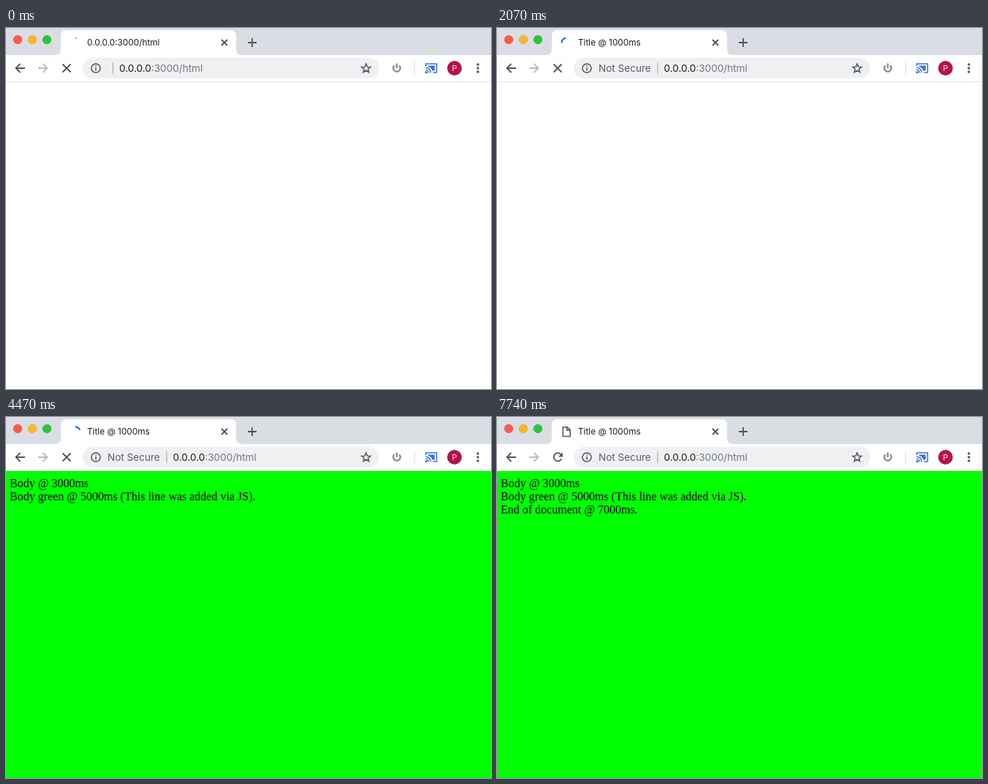
These frames come from a looping animation (664x494 px, 7.83 s). An HTML page:

```html
<!DOCTYPE html>
<html lang="en">
<head>
<meta charset="utf-8">
<title>Progressive page load</title>
<style>
html, body { margin: 0; width: 100%; height: 100%; overflow: hidden; background: #fff; }
svg { display: block; }
.line { fill: none; stroke: #505459; stroke-width: 1.8; }
.thin { stroke-width: 1.5; }
.ui { font-family: Inter, Roboto, sans-serif; font-size: 13.55px; fill: #18191b; }
.page { font: 16px "Liberation Serif", "Times New Roman", serif; fill: #000; }
.soft { fill: #74787d; }
</style>
</head>
<body>
<svg width="664" height="494" viewBox="0 0 664 494">
  <rect width="664" height="494" fill="#fff"/>
  <rect width="664" height="37" fill="#dadde3"/>
  <g stroke-width=".6">
    <circle cx="16" cy="16" r="5.8" fill="#ff5a4a" stroke="#e2493f"/>
    <circle cx="36" cy="16" r="5.8" fill="#fdb62a" stroke="#e0a02a"/>
    <circle cx="56" cy="16" r="5.8" fill="#28c63c" stroke="#1cad2c"/>
  </g>
  <path d="M67 37q8 0 8-8V11q0-8 8-8H307q8 0 8 8V29q0 8 8 8z" fill="#fff"/>
  <path class="line" d="M295 16l8 8m0-8l-8 8M331 20h12m-6-6v12"/>
  <text id="title" class="ui" x="111" y="24" style="font-size:11.8px"></text>
  <circle id="spinner" r="6.4" fill="none" stroke-width="2" pathLength="360"/>
  <path id="doc" class="line thin" d="M90.2 13.7h5.8l4.2 4.2v8.6h-10zM95.7 13.9v4.3h4.3"/>

  <path class="line" d="M26 55H13.5m6-6l-6 6 6 6"/>
  <path class="line" style="stroke:#b9bbbe" d="M44 55h12.5m-6-6l6 6-6 6"/>
  <path id="stop" class="line" d="M77.5 49.5l11 11m0-11l-11 11"/>
  <g id="reload">
    <path class="line" d="M87.6 51.2A5.6 5.6 0 1 0 88.4 57"/>
    <path d="M89.8 48.5v6h-6z" fill="#505459"/>
  </g>
  <rect x="105" y="41" width="406" height="28" rx="14" fill="#eef0f2"/>
  <circle class="line thin" cx="123" cy="55" r="6.1"/>
  <path class="line thin" d="M123 54v4.5M123 51v1.6"/>
  <text id="secure" class="ui" x="139" y="60" style="fill:#5a5e63">Not Secure</text>
  <g id="address">
    <path d="M146.5 47v16" stroke="#9c9fa3"/>
    <text class="ui" x="155" y="60">0.0.0.0<tspan class="soft">:3000/html</tspan></text>
  </g>
  <path id="star" class="line thin"/>
  <path d="M531.7 51.4a4.8 4.8 0 1 0 6.6 0M535 48.5v6.5" fill="none" stroke="#8c8d8e" stroke-width="2.4"/>
  <path d="M559.5 47v16" stroke="#dcdee1"/>
  <g fill="none" stroke="#3b74d8" stroke-width="1.6">
    <path d="M574.8 52v-3h14.7v12h-5M574.5 57.3a4 4 0 0 1 4 4M574.5 54.3a7 7 0 0 1 7 7"/>
    <path d="M577.5 51.6h9.4v7h-3.2q-1.6-4.6-6.2-6z" fill="#3b74d8" stroke="none"/>
    <circle cx="575.3" cy="60.7" r=".8"/>
  </g>
  <circle cx="614" cy="55" r="10" fill="#b5134a"/>
  <text class="ui" x="614" y="59" text-anchor="middle" style="font-size:11px;fill:#f8e4ec">P</text>
  <g fill="#505459">
    <circle cx="646" cy="50" r="1.7"/><circle cx="646" cy="55" r="1.7"/><circle cx="646" cy="60" r="1.7"/>
  </g>
  <path d="M0 73.5h664" stroke="#e3e5e8"/>

  <rect id="green" y="74" width="664" height="420" fill="#0f0"/>
  <g class="page">
    <text id="body" x="5" y="96">Body @ 3000ms</text>
    <text id="added" x="5" y="114">Body green @ 5000ms (This line was added via JS).</text>
    <text id="end" x="5" y="132">End of document @ 7000ms.</text>
  </g>
</svg>
<script>
const LOOP = 7830, STEP = 30;
const COMMIT = 760, BODY = 2610, GREEN = 4470, END = 6330;
const WAIT_TURN = 1180, SPIN_TURN = 1400, HALF_SWEEP = 595, SWEEP_START = 620, MAX_ARC = 270;
const $ = id => document.getElementById(id);
const show = (id, on) => $(id).setAttribute('visibility', on ? 'visible' : 'hidden');

$('star').setAttribute('d', 'M' + Array.from({ length: 10 }, (_, i) => {
  const r = i % 2 ? 2.8 : 6.4, a = (i / 5 - .5) * Math.PI;
  return [493 + r * Math.cos(a), 55.4 + r * Math.sin(a)].map(n => n.toFixed(2));
}).join('L') + 'z');

// cubic-bezier(.4, 0, .2, 1)
function ease(x) {
  let lo = 0, hi = 1, s;
  for (let i = 0; i < 20; i++) {
    s = (lo + hi) / 2;
    const at = 1.2 * s * (1 - s) ** 2 + .6 * s * s * (1 - s) + s ** 3;
    if (at < x) lo = s; else hi = s;
  }
  return s * s * (3 - 2 * s);
}

// Counter-clockwise while waiting for the server.
function waitingArc(t) {
  const turn = 360 * t / WAIT_TURN;
  return { from: -90 - turn, size: Math.min(turn, 180) };
}

// Clockwise while loading: the arc shrinks towards its head, then grows again.
function loadingArc(t) {
  const phase = (t - SWEEP_START) / HALF_SWEEP, part = phase % 2;
  const head = 90 + 360 * (t - 1050) / SPIN_TURN + MAX_ARC * Math.floor(phase / 2);
  const size = MAX_ARC * (part < 1 ? 1 - ease(part) : ease(part - 1));
  return { from: part < 1 ? head - size : head, size };
}

function drawSpinner(t) {
  const arc = t < COMMIT ? waitingArc(t) : loadingArc(t);
  const mix = Math.min(1, Math.max(0, (t - COMMIT) / 400));
  const color = [[120, 28], [124, 104], [130, 200]].map(([a, b]) => Math.round(a + (b - a) * mix));
  const ring = $('spinner');
  ring.setAttribute('stroke', `rgb(${color})`);
  ring.setAttribute('stroke-dasharray', `${Math.max(arc.size, 14)} 360`);
  ring.setAttribute('transform', `translate(95 20) rotate(${arc.from})`);
}

function draw(now) {
  const t = Math.floor(now % LOOP / STEP) * STEP;
  const committed = t >= COMMIT, done = t >= END;
  $('title').textContent = committed ? 'Title @ 1000ms' : '0.0.0.0:3000/html';
  $('address').setAttribute('transform', `translate(${committed ? 73.5 : 0} 0)`);
  show('secure', committed);
  show('body', t >= BODY);
  show('green', t >= GREEN);
  show('added', t >= GREEN);
  for (const id of ['end', 'doc', 'reload']) show(id, done);
  for (const id of ['spinner', 'stop']) show(id, !done);
  drawSpinner(t);
}

const start = performance.now();
(function tick() {
  draw(performance.now() - start);
  requestAnimationFrame(tick);
})();
</script>
</body>
</html>
```
